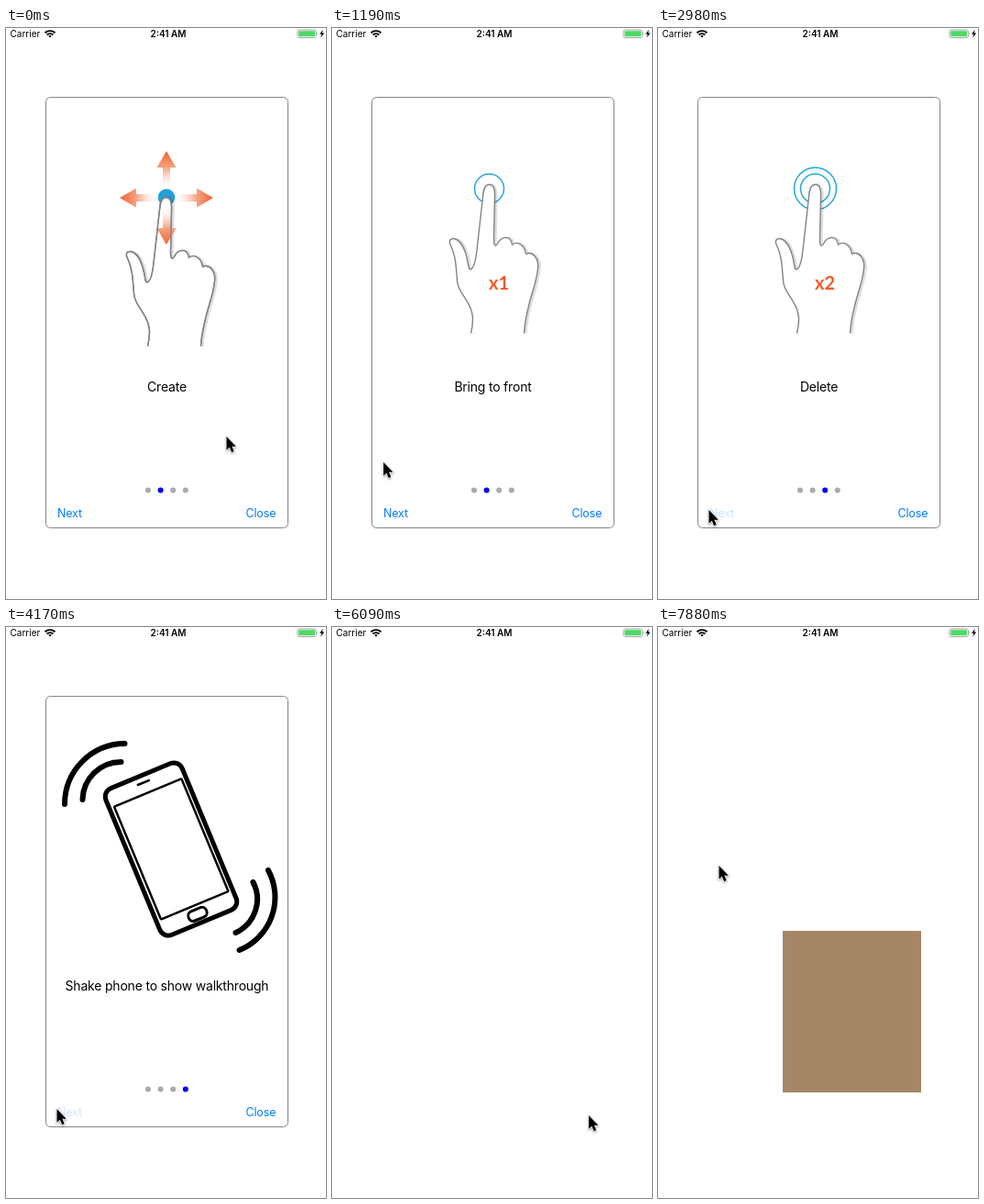
Write an HTML page that moves like this. It is 349 px wide and 622 px high and loops after 8000 ms.

```html
<!DOCTYPE html>
<html lang="en">
<head>
<meta charset="utf-8">
<title>Gesture walkthrough</title>
<style>
  html, body { margin: 0; width: 100%; height: 100%; overflow: hidden; background: #fff; }
  svg { display: block; width: 349px; height: 622px; font-family: Inter, "Liberation Sans", sans-serif; }
  .label { font-size: 14px; letter-spacing: -.2px; text-anchor: middle; }
  .button { font-size: 12.5px; letter-spacing: -.15px; fill: #007aff; }
  .status { font-size: 10px; }
  .count { font: 700 20px Lato, sans-serif; fill: #f15a29; text-anchor: middle; }
  .line { fill: none; stroke: #000; stroke-linecap: round; }
  .ring { fill: none; stroke: #22a7dc; stroke-width: 1.5; }
</style>
</head>
<body>
<svg viewBox="0 0 349 622">
  <defs>
    <clipPath id="cardClip"><rect x="44" y="76" width="263" height="468" rx="5"/></clipPath>
    <linearGradient id="fade" x1="0" y1="0" x2="0" y2="1">
      <stop offset="0" stop-color="#f1622f"/>
      <stop offset=".42" stop-color="#f6a283"/>
      <stop offset="1" stop-color="#fff" stop-opacity="0"/>
    </linearGradient>
    <path id="arrow" d="M0-51L10.5-33H4V-8H-4V-33H-10.5Z" fill="url(#fade)"/>
    <path id="outline" d="M154.500 346.500C158 332 157 323 151 313C146 304 140 299 139.500 289C138.500 276 138 262 132.500 251C130 246 132 243 136 243.500C143 244.500 148 255 150.500 266C152 274 152 277 154 277C158 276 160 265 161 256L167.500 198C168 189 170 184.500 174.500 184.500C179 184.500 181 189 180.500 198L179.500 244C179.500 251 181 253 183.500 249C188 240 198 240 199.500 250C205 246 213 250 214.500 260C222 257 229 265 227.500 276C226 292 220 304 217 319C214 331 213 338 212.500 346.500"/>
    <g id="hand">
      <use href="#outline" x="1.700" y=".4" fill="none" stroke="#000" stroke-opacity=".13" stroke-width="3"/>
      <use href="#outline" fill="#fff" stroke="#838383" stroke-width="1.400"/>
    </g>
  </defs>
  <rect width="349" height="622" fill="#fff"/>

  <g class="status">
    <text x="4.500" y="10">Carrier</text>
    <g fill="none" stroke="#000" stroke-width="1.900">
      <path d="M42.500 5.300A8 8 0 0 1 53.500 5.300M44.600 7.500A5 5 0 0 1 51.400 7.500"/>
      <path d="M48 10.600L46.300 8.800A2.500 2.500 0 0 1 49.700 8.800Z" fill="#000" stroke="none"/>
    </g>
    <text x="177" y="10" text-anchor="middle" font-weight="600">2:41 AM</text>
    <rect x="317.900" y="2" width="20.400" height="8.600" rx="2" fill="#fff" stroke="#999" stroke-width=".9"/>
    <rect x="319.200" y="3.300" width="17.800" height="6" rx="1" fill="#4cd964"/>
    <path d="M339.300 4.800Q340.800 6.300 339.300 7.800Z" fill="#999"/>
    <path d="M345.800 1.800L342 6.700H344.400L343 10.800L347.200 5.500H344.800Z"/>
  </g>

  <rect id="box" fill="#a58768"/>

  <g id="card">
    <rect x="43.500" y="75.500" width="264" height="469" rx="5" fill="#fff" stroke="#858585"/>
    <g clip-path="url(#cardClip)">
      <g id="pages">
        <g>
          <use href="#arrow" transform="translate(175 185)"/>
          <use href="#arrow" transform="translate(175 185) rotate(90)"/>
          <use href="#arrow" transform="translate(175 185) rotate(-90)"/>
          <circle cx="175" cy="184.500" r="9.300" fill="#22a0dc"/>
          <use href="#hand"/>
          <use href="#arrow" transform="translate(175 185) rotate(180)"/>
          <use href="#outline" fill="none" stroke="#838383" stroke-width="1.400"/>
          <text class="label" x="175.500" y="396">Create</text>
        </g>
        <g transform="translate(264)">
          <circle class="ring" cx="171.500" cy="175" r="16"/>
          <use href="#hand" x="-3" y="-14"/>
          <text class="count" x="182" y="284.500">x1</text>
          <text class="label" x="175.500" y="396">Bring to front</text>
        </g>
        <g transform="translate(528)">
          <circle class="ring" cx="171.500" cy="175" r="16"/>
          <circle class="ring" cx="171.500" cy="175" r="23"/>
          <use href="#hand" x="-3" y="-14"/>
          <text class="count" x="182" y="284.500">x2</text>
          <text class="label" x="175.500" y="396">Delete</text>
        </g>
        <g transform="translate(792)">
          <g class="line" transform="translate(180 242) rotate(-22.600)">
            <rect x="-45" y="-86.500" width="90" height="173" rx="10" stroke-width="5"/>
            <rect x="-39.500" y="-66.500" width="79.500" height="133" rx="1" stroke-width="2.500"/>
            <path d="M-6.500-78.500H6.500" stroke-width="2.500"/>
            <rect x="-11" y="71" width="21" height="11" rx="5" stroke-width="3"/>
          </g>
          <path class="line" stroke-width="6" d="M64 193A66 66 0 0 1 129.500 127M83.500 188A42 42 0 0 1 125.500 147M286 265A62 62 0 0 1 254.500 352M269.500 278A40 40 0 0 1 250.500 333"/>
          <text class="label" x="175.500" y="396">Shake phone to show walkthrough</text>
        </g>
      </g>
    </g>
    <g id="dots"></g>
    <text id="next" class="button" x="56" y="532.500">Next</text>
    <text id="close" class="button" x="261.500" y="532.500">Close</text>
  </g>

  <path id="cursor" d="M0 0V14.800L3.300 11.700L5.700 17.200L8.200 16.100L5.900 10.800H10.400Z"
        stroke="#fff" stroke-width="1.300" paint-order="stroke" style="filter:drop-shadow(0 1px 1px #0006)"/>
</svg>
<script>
const LOOP = 8000, PAGE = 264, TICK = 148.6, FIRST_TICK = 450;
const $ = id => document.getElementById(id);
const clamp = x => Math.max(0, Math.min(1, x));
const easeOut = x => 1 - (1 - x) ** 3;
const easeInOut = x => x < .5 ? 2 * x * x : 1 - 2 * (1 - x) ** 2;
const within = (t, spans) => spans.some(([from, to]) => t >= from && t < to);

const dots = [0, 1, 2, 3].map(i => {
  const dot = document.createElementNS("http://www.w3.org/2000/svg", "circle");
  Object.entries({ cx: 155 + i * 13.6, cy: 503.6, r: 3 }).forEach(([k, v]) => dot.setAttribute(k, v));
  return $("dots").appendChild(dot);
});

// start, end, page before, page after, easing
const scrolls = [
  [440, 1040, 0, 1, easeOut],
  [1905, 2084, 1, 2, easeInOut],
  [3045, 3240, 2, 3, easeInOut],
  [4200, 4420, 3, 0, easeInOut]
];
// time, x, y
const cursorPath = [
  [400, 240.5, 445], [747, 57.5, 445], [1045, 57.5, 447], [1490, 53.5, 525], [1640, 55.5, 525],
  [5340, 55.5, 525], [5350, 167.5, 552.5], [5500, 265, 535], [5640, 280, 532], [6250, 280, 532],
  [6390, 287, 507], [6540, 265, 480], [6690, 203, 408], [6839, 151.5, 352],
  [6980, 130, 326], [7270, 130, 326], [7880, 66.5, 260]
];
const cornerPath = [
  [6390, 287, 507], [6540, 268, 482], [6690, 214, 413], [6839, 164, 356], [6980, 136, 331]
];

function along(path, t) {
  const next = path.findIndex(p => p[0] > t);
  if (next === 0) return path[0].slice(1);
  if (next < 0) return path.at(-1).slice(1);
  const a = path[next - 1], b = path[next], k = (t - a[0]) / (b[0] - a[0]);
  return [a[1] + (b[1] - a[1]) * k, a[2] + (b[2] - a[2]) * k];
}

function pageAt(t) {
  const [start, end, from, to, ease] = scrolls.findLast(s => t >= s[0]) || scrolls[0];
  return from + (to - from) * ease(clamp((t - start) / (end - start)));
}

function draw(time) {
  const t = FIRST_TICK + Math.floor((time - FIRST_TICK + 12) / TICK) * TICK;
  const page = pageAt(t);
  $("pages").setAttribute("transform", `translate(${-page * PAGE})`);

  const active = t < 1050 ? 1 : Math.round(page);
  dots.forEach((dot, i) => dot.setAttribute("fill", i === active ? "#0000f5" : "#aaa"));

  $("next").setAttribute("opacity", within(t, [[1930, 2200], [2970, 3240], [4160, 4580]]) ? .2 : 1);
  $("close").setAttribute("opacity", within(t, [[5640, 5900]]) ? .2 : 1);
  $("card").setAttribute("opacity", 1 - clamp((t - 5700) / 390));

  const [x, y] = along(cornerPath, t);
  Object.entries({ x, y, width: 287 - x, height: 507 - y }).forEach(([k, v]) => $("box").setAttribute(k, v));
  $("cursor").setAttribute("transform", `translate(${along(cursorPath, t)})`);
}

function frame() {
  draw(performance.now() % LOOP);
  requestAnimationFrame(frame);
}
frame();
</script>
</body>
</html>
```
